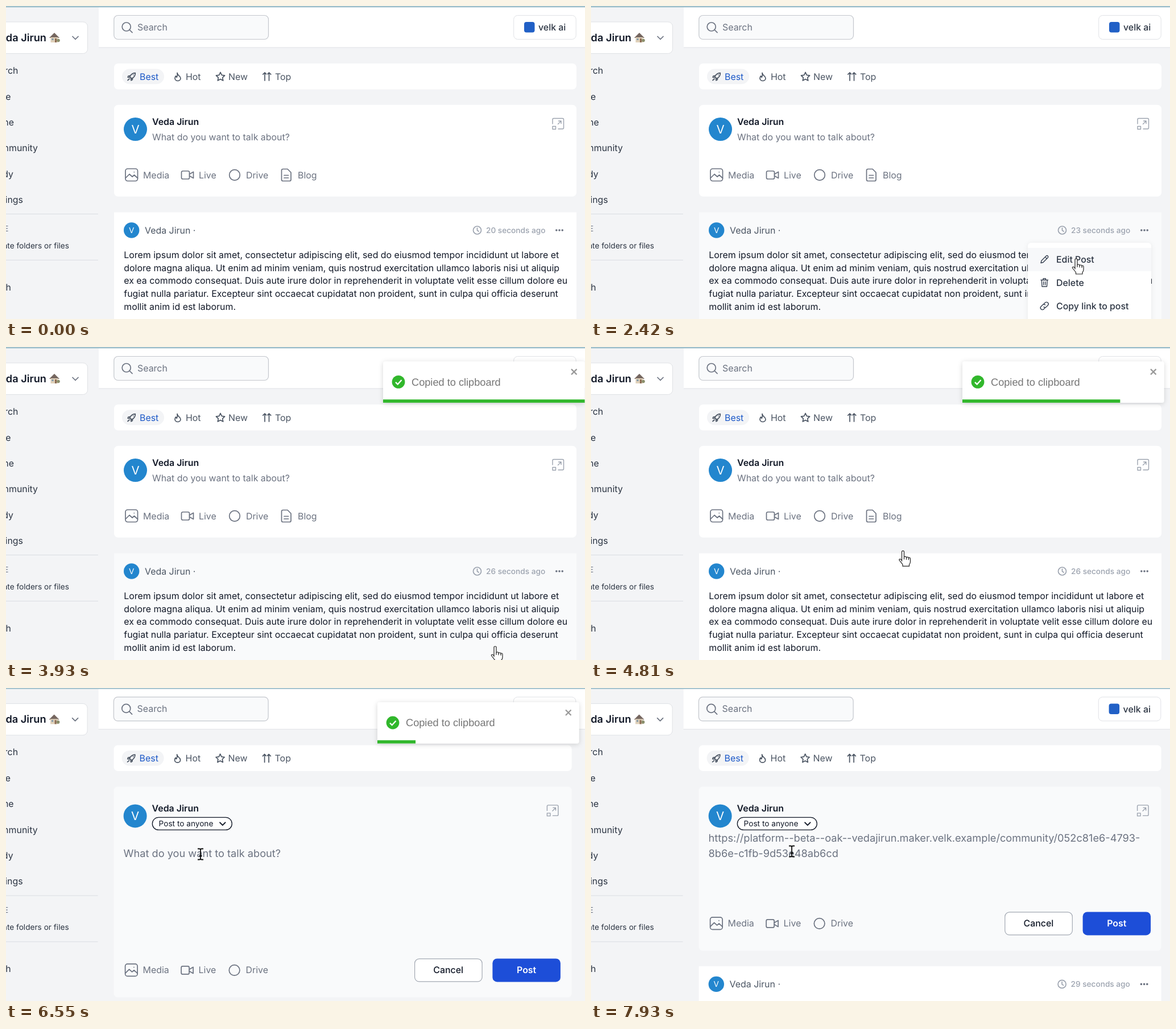
Write an HTML page that moves like this. It is 1018x550 px and loops after 8 s.

```html
<!DOCTYPE html>
<html lang="en">
<head>
<meta charset="utf-8">
<title>Community feed</title>
<style>
  html, body { margin: 0; width: 100%; height: 100%; overflow: hidden; background: #f3f4f6; }
  svg { display: block; width: 1018px; height: 550px; }
  text { font: 400 15.92px Inter, sans-serif; fill: #6b7280; white-space: pre; text-rendering: geometricPrecision; }
  .sm { font-size: 13.65px; }
  .lg { font-size: 18.19px; }
  .med { font-weight: 500; }
  .semi { font-weight: 600; }
  .ink { fill: #111827; }
  .dark { fill: #2b3442; }
  .mid { fill: #4b5563; }
  .end { text-anchor: end; }
  .ctr { text-anchor: middle; }
  .icon { fill: none; stroke: #6b7280; stroke-width: 1.7; stroke-linecap: round; stroke-linejoin: round; }
  .blue { fill: #1d59c8; }
  .white { fill: #fff; }
</style>
</head>
<body>
<svg viewBox="0 0 1018 550">
  <defs>
    <filter id="shade" x="-10%" y="-30%" width="120%" height="170%">
      <feDropShadow dx="0" dy="1.5" stdDeviation="4.5" flood-color="#000" flood-opacity=".16"/>
    </filter>
    <filter id="soft" x="-10%" y="-10%" width="120%" height="120%">
      <feDropShadow dx="0" dy="1" stdDeviation="4" flood-color="#000" flood-opacity=".07"/>
    </filter>
  </defs>
  <rect width="1018" height="550" fill="#f3f4f6"/>

  <g id="page">
    <rect x="163" y="0" width="860" height="72.5" fill="#fff"/>
    <path d="M163 73H1024" stroke="#e1e3e7"/>
    <rect x="-5" y="0" width="1030" height="2.4" fill="#9dbfcb"/>

    <g id="side">
      <rect x="-40" y="28" width="183.5" height="55.5" rx="8" fill="#fff" stroke="#dfe1e5"/>
      <path d="M76 56L85 47L94 56Z" fill="#75665f"/>
      <path d="M78.500 55H91.500V64H78.500Z" fill="#dfd0b9"/>
      <path d="M80.500 57H83.500V60H80.500Z" fill="#7f98a8"/>
      <path d="M86 57H89V64H86Z" fill="#8c6a52"/>
      <circle cx="92" cy="60.500" r="2.800" fill="#8a8f6c"/>
      <path class="icon" d="M117 53.500l5 5 5-5" stroke-width="2"/>
      <path d="M-5 365.500H162M-5 446.500H162" stroke="#dadde2"/>
    </g>

    <rect x="189.800" y="16.500" width="271.700" height="42" rx="7" fill="#f9fafb" stroke="#c4c7cd" stroke-width="1.200"/>
    <path class="icon" d="M204.200 36.500a7.500 7.500 0 1 0 15 0a7.500 7.500 0 1 0-15 0M217.300 42l4.700 4.700" stroke-width="1.900"/>
    <text x="231" y="43">Search</text>
    <rect x="892.700" y="16.500" width="109.500" height="42" rx="7" fill="#fff" stroke="#e0e2e6"/>
    <rect x="911" y="28" width="18.500" height="18.500" rx="4" fill="#2160c6"/>
    <text class="med dark" x="936" y="43.300">velk ai</text>

    <rect id="tabs" x="190" y="101" width="813" height="45.500" rx="7" fill="#fff"/>
    <rect x="204" y="110.500" width="74" height="26.700" rx="13.300" fill="#f3f4f6"/>
    <g class="icon" stroke-width="1.500" style="stroke:#4b5563">
      <path d="M217.500 124.500q3-6.500 9.800-6.800q.2 6.500-6.300 9.800zM218.500 122.300l-3.500.7-.8 2.300 3.300.2M222.700 126.500l-.4 3-2.300 1.300-.3-3.200M217 128l-3 2.500M224 121h.1"/>
      <path d="M301 117.500q.5 3 3 4.800q3 2.300 3 4.700a5 4.500 0 0 1-10 0q0-2.500 1.700-4q.3 2 1.500 2.300q1.800-3.500.8-7.800z"/>
      <path d="M377 116.500l2.300 4.900 5.300.7-3.900 3.700 1 5.300-4.700-2.600-4.700 2.600 1-5.300-3.900-3.700 5.300-.7z"/>
      <path d="M455 131v-14l-3.200 3.200M455 117l2.500 2.700M462.500 131v-14l-2.500 2.700M462.500 117l3.200 3.200"/>
    </g>
    <text class="blue" x="235" y="129.500">Best</text>
    <text class="mid" x="316" y="129.500">Hot</text>
    <text class="mid" x="391" y="129.500">New</text>
    <text class="mid" x="473" y="129.500">Top</text>

    <g id="post">
      <rect id="postBg" x="190" y="362.500" width="813" height="260"/>
      <circle cx="220.700" cy="394" r="13.700" fill="#2386ce"/>
      <text class="sm ctr white" x="220.700" y="399">V</text>
      <text class="mid" x="244" y="399.800">Veda Jirun ·</text>
      <path class="icon" d="M821.500 394a7 7 0 1 0 14 0a7 7 0 1 0-14 0M828.500 390v4.300l2.600 1.700" style="stroke:#9ca3af" stroke-width="1.400"/>
      <text id="ago" class="sm med" x="844" y="399" style="fill:#9ca3af"></text>
      <path class="icon" d="M967.800 394h.01M973 394h.01M978.200 394h.01" stroke-width="3.600" style="stroke-width:3.600px"/>
      <g id="lorem"></g>
    </g>

    <g id="composer">
      <rect id="compBg" x="190" y="173.800" width="813" rx="7"/>
      <g id="who">
        <circle cx="227.500" cy="216.500" r="20.500" fill="#2386ce"/>
        <text class="ctr white" x="227.500" y="224" style="font-size:20.500px">V</text>
        <text class="semi ink" x="257" y="208.800">Veda Jirun</text>
      </g>
      <g id="expand" class="icon" style="stroke:#9ca3af;stroke-width:1.400px">
        <path d="M961 207v-7.500q0-2 2-2h15.500q2 0 2 2V214q0 2-2 2H971M961 211.500h5.500v5H961zM970.500 207.500l5.500-5.500M971.500 202h4.500v4.500"/>
      </g>
      <g id="pill">
        <rect x="257.700" y="228" width="140" height="22" rx="11" fill="#fff" stroke="#111827" stroke-width="1.300"/>
        <text class="sm ink" x="269" y="243.800">Post to anyone</text>
        <path class="icon" d="M376.500 237l4.700 4.700 4.700-4.700" style="stroke:#111827;stroke-width:2px"/>
      </g>
      <text id="hint">What do you want to talk about?</text>
      <path id="caret" d="M257.500 249V271" stroke="#6b7280"/>
      <g id="link">
        <text class="lg" x="207" y="270.500">https://platform--beta--oak--vedajirun.maker.velk.example/community/052c81e6-4793-</text>
        <text class="lg" x="207" y="297.500">8b6e-c1fb-9d53e48ab6cd</text>
      </g>
      <g id="actions">
        <g class="icon">
          <rect x="210" y="286" width="21.500" height="21.500" rx="4"/>
          <path d="M210.500 302l6.500-6.500 5 4.500 3.500-3 6 5.500M225.300 291.800h.01"/>
          <rect x="308.500" y="290" width="14" height="14" rx="2.500"/>
          <path d="M322.500 295.500l7-4v11l-7-4"/>
          <circle cx="402" cy="297" r="9.300"/>
          <g id="blogIcon"><path d="M487 286.500h8l6 6V305q0 2.500-2.500 2.500H487q-2.500 0-2.500-2.500V289q0-2.500 2.500-2.500zM489 297.500h7.500M489 302h7.500"/></g>
        </g>
        <text x="241" y="302.600">Media</text>
        <text x="339" y="302.600">Live</text>
        <text x="422" y="302.600">Drive</text>
        <text id="blog" x="513" y="302.600">Blog</text>
      </g>
      <g id="buttons">
        <rect x="728.200" y="394.500" width="118.500" height="40" rx="8" fill="#fff" stroke="#a3a9b3" stroke-width="1.200"/>
        <text class="med ink ctr" x="787.300" y="420">Cancel</text>
        <rect x="865" y="394" width="119.500" height="41" rx="8" fill="#1d4ed8"/>
        <text class="semi white ctr" x="924.700" y="420">Post</text>
      </g>
    </g>

    <g id="menu">
      <rect x="768" y="416" width="217" height="170" rx="6" fill="#fff" filter="url(#soft)"/>
      <rect id="row" x="768" width="217" height="41" fill="#f7f8fa"/>
      <g class="icon" style="stroke:#374151;stroke-width:1.400px">
        <path d="M791 451.500l1-4 8.500-8.500q1.500-1 2.700.3t.2 2.700L795 450.500zM798.500 441l3 3"/>
        <path d="M791 481.500h12.500M795 481.500v-2.500h4.500v2.500M792.300 481.500l.7 11.500h8.500l.7-11.500M795.700 484.500v5.500M798.800 484.500v5.500"/>
        <path d="M796 523.800l2.500-2.500a3.300 3.300 0 0 1 4.700 4.700l-2.700 2.700a3.300 3.300 0 0 1-4.500 0M798.500 530.200l-2.500 2.500a3.300 3.300 0 0 1-4.700-4.700l2.700-2.700a3.300 3.300 0 0 1 4.500 0"/>
      </g>
      <text class="med dark" x="818" y="451">Edit Post</text>
      <text class="med dark" x="818" y="491.800">Delete</text>
      <text class="med dark" x="818" y="532.700">Copy link to post</text>
    </g>
  </g>

  <g id="toast">
    <rect x="653" y="25" width="354.500" height="72.500" rx="4" fill="#fff" filter="url(#shade)"/>
    <circle cx="680" cy="61" r="11.400" fill="#31b72c"/>
    <path d="M675 61.500l3.700 3.700 6.800-7.500" fill="none" stroke="#fff" stroke-width="2.300"/>
    <text x="703" y="67.200" style="font:18.190px 'Liberation Sans',Arial,sans-serif;fill:#757575">Copied to clipboard</text>
    <path d="M984 38.500l9.500 9.500M993.500 38.500l-9.500 9.500" stroke="#999" stroke-width="2.200"/>
    <rect id="bar" x="653" y="91.800" height="5.700" fill="#31b72c"/>
  </g>

  <g id="hand" fill="#fff" stroke="#222" stroke-width="1.200" stroke-linejoin="round">
    <path d="M-2 16V0Q-2-2 0-2T2 0V9Q2 8 4 8T6 10Q6 9 8 9T10 11Q10 10 11.500 10T13 12V17Q13 20 11 22V25H-.5V22L-6 15Q-7.500 13-5.500 12.500Q-4 12-2 15Z"/>
    <path d="M2 9V13M6 10V13.500M10 11V14" fill="none"/>
  </g>
  <path id="beam" d="M-5-9.500H-2Q0-9.500 0-7.500Q0-9.500 2-9.500H5M0-8V8M-5 9.500H-2Q0 9.500 0 7.500Q0 9.500 2 9.500H5M-2.500 3H2.500" fill="none" stroke="#111" stroke-width="1.800"/>
</svg>

<script>
const LOOP = 8000, TICK = 125.5, FIRST = 385;
const $ = id => document.getElementById(id);
const set = (id, attrs) => { for (const k in attrs) $(id).setAttribute(k, attrs[k]); };
const show = (id, on) => { $(id).style.display = on ? '' : 'none'; };
const move = (id, x, y) => set(id, { transform: `translate(${x} ${y})` });
const clamp = v => Math.min(1, Math.max(0, v));
const smooth = v => v * v * (3 - 2 * v);
const easeOut = v => 1 - (1 - v) ** 3;

const addText = (parent, text, x, y, cls) => {
  const el = document.createElementNS('http://www.w3.org/2000/svg', 'text');
  el.textContent = text;
  el.setAttribute('class', cls);
  el.setAttribute('x', x);
  el.setAttribute('y', y);
  $(parent).append(el);
};

// Side labels are cut by the left edge, so they hang from their right end.
[
  ['Veda Jirun', 71, 62, 'lg semi ink'], ['Search', 21.5, 119, 'dark'], ['Note', 8.5, 164.5, 'dark'],
  ['Home', 14, 210, 'dark'], ['Community', 56, 255.3, 'dark'], ['Study', 13, 300.8, 'dark'],
  ['Settings', 30, 346, 'dark'], ['STORAGE', 4.5, 395.5, 'sm'],
  ['Create folders or files', 111, 426, 'sm dark'], ['Trash', 9, 500, 'dark']
].forEach(([text, x, y, cls]) => addText('side', text, x, y, cls + ' end'));

[
  'Lorem ipsum dolor sit amet, consectetur adipiscing elit, sed do eiusmod tempor incididunt ut labore et',
  'dolore magna aliqua. Ut enim ad minim veniam, quis nostrud exercitation ullamco laboris nisi ut aliquip',
  'ex ea commodo consequat. Duis aute irure dolor in reprehenderit in voluptate velit esse cillum dolore eu',
  'fugiat nulla pariatur. Excepteur sint occaecat cupidatat non proident, sunt in culpa qui officia deserunt',
  'mollit anim id est laborum.'
].forEach((line, i) => addText('lorem', line, 207.3, 443 + i * 22.72, 'ink'));

// Composer layouts: start, width, height, action shift, post shift, hint position and size.
const layouts = [
  { at: 0, w: 813, h: 161, act: 0, post: 0, hx: 257, hy: 236, size: 15.92 },
  { at: 5525, w: 813, h: 243.5, act: 82, post: 82, hx: 257, hy: 266, size: 18.19, caret: true },
  { at: 5770, w: 805, h: 370.5, act: 199.5, post: 209, hx: 207, hy: 297.8, size: 18.19, form: true },
  { at: 7400, w: 813, h: 288.5, act: 117.5, post: 127, hx: 207, hy: 297.8, size: 18.19, form: true }
];

// Pointer stops: time, x, y.
const stops = [
  [500, 640, 575], [1010, 977, 390], [1640, 977, 390], [1930, 853, 446], [2650, 853, 446],
  [3150, 860, 528], [4200, 860, 528], [5250, 318, 236], [5650, 318, 236], [6050, 342, 292],
  [6540, 342, 292], [7300, 353, 287]
];
const MENU_ON = 1260, MENU_OFF = 3500, PASTE = 6650;
const TOAST_IN = 3375, BAR_START = 4133, TOAST_OUT = 7095;

function pointer(t) {
  const i = stops.findIndex(s => s[0] > t);
  if (i === 0) return stops[0].slice(1);
  if (i < 0) return stops[stops.length - 1].slice(1);
  const [t0, x0, y0] = stops[i - 1], [t1, x1, y1] = stops[i];
  const k = smooth((t - t0) / (t1 - t0));
  return [x0 + (x1 - x0) * k, y0 + (y1 - y0) * k];
}

// Bounces in from the right, and later leaves the same way.
function toastShift(t) {
  if (t >= TOAST_OUT) {
    const p = (t - TOAST_OUT) / 700;
    return p < .2 ? -20 * smooth(p / .2) : -20 + 2020 * smooth(clamp((p - .2) / .8));
  }
  const p = clamp((t - TOAST_IN) / 700);
  const hops = [[0, 3000], [.6, -25], [.75, 10], [.9, -5], [1, 0]];
  for (let i = 1; i < hops.length; i++) {
    const [p0, x0] = hops[i - 1], [p1, x1] = hops[i];
    if (p <= p1) return x0 + (x1 - x0) * easeOut((p - p0) / (p1 - p0));
  }
  return 0;
}

function draw(now) {
  const raw = now % LOOP;
  const t = raw < FIRST ? 0 : FIRST + TICK * Math.floor((raw - FIRST) / TICK);
  const lay = layouts.filter(l => l.at <= t).pop();
  const [x, y] = pointer(t);
  const pan = smooth(clamp((t - 5000) / 500));
  const drop = lay.form ? 9 : 0;
  const inset = lay.w - 813;
  const tint = on => on ? '#f9fafb' : '#ffffff';
  const pasted = t >= PASTE;

  move('page', -.4 * pan, -.6 * pan);
  set('tabs', { width: lay.w });
  set('compBg', { width: lay.w, height: lay.h, fill: tint(y > 174 && y < 174 + lay.h) });
  set('postBg', { fill: tint(t > 500 && y > 362.5 + lay.post) });
  move('who', 0, drop);
  move('expand', inset * 1.15, drop);
  move('actions', 0, lay.act);
  move('buttons', inset * 1.15, lay.act - 117.5);
  move('post', 0, lay.post);

  show('pill', lay.form);
  show('buttons', lay.form);
  show('blog', !lay.form);
  show('blogIcon', !lay.form);
  show('caret', lay.caret);
  show('hint', !pasted);
  show('link', pasted);
  set('hint', { x: lay.hx, y: lay.hy });
  $('hint').style.fontSize = lay.size + 'px';
  $('ago').textContent = 20 + 3 * Math.floor((t + 2400) / 3000) + ' seconds ago';

  const row = Math.floor((y - 425) / 41);
  show('menu', t >= MENU_ON && t < MENU_OFF);
  show('row', row >= 0);
  set('row', { y: 425 + 41 * Math.max(0, row) });

  show('toast', t >= TOAST_IN && t < TOAST_OUT + 700);
  move('toast', toastShift(t), .4 * (1 - pan));
  set('bar', { width: 354.5 * (1 - clamp((t - BAR_START) / (TOAST_OUT - BAR_START))) });

  show('hand', t > 500 && !lay.form);
  show('beam', lay.form);
  move('hand', x, y);
  move('beam', x, y);
}

const begin = performance.now();
function loop() {
  draw(performance.now() - begin);
  requestAnimationFrame(loop);
}
loop();
</script>
</body>
</html>
```
